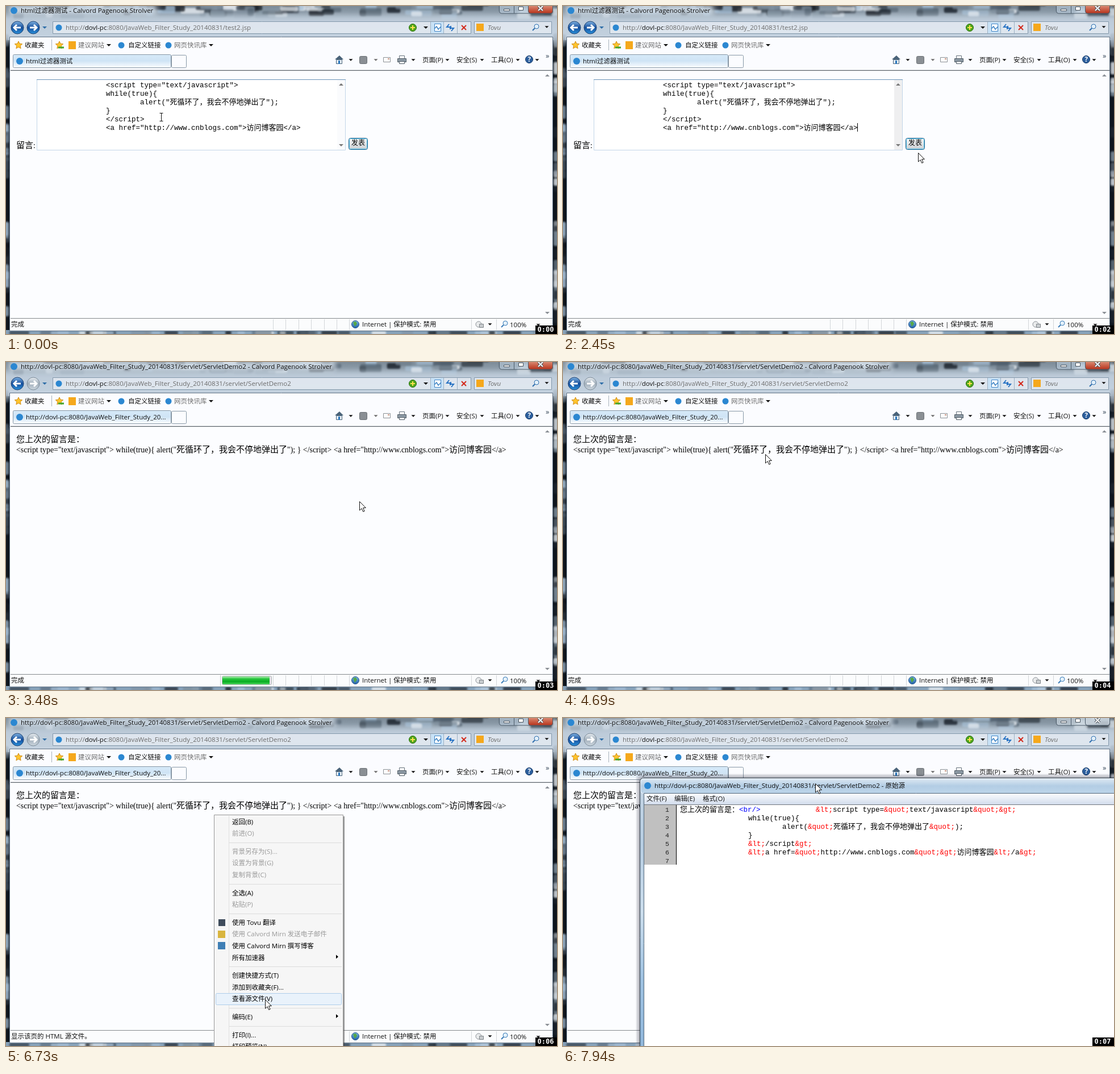
An HTML page with a canvas for the animation above (8000 ms loop, 970 px wide and 577 px high).

```html
<!DOCTYPE html>
<html lang="zh-CN">
<head>
<meta charset="utf-8">
<title>Filter demo</title>
<style>
html, body { margin: 0; width: 100%; height: 100%; overflow: hidden; }
canvas { display: block; width: 970px; height: 577px; }
</style>
</head>
<body>
<canvas id="stage" width="970" height="577"></canvas>
<script>
const LOOP = 8000, W = 970, H = 577;
const stage = document.getElementById('stage').getContext('2d');
let c = stage;

const CJK = '"Noto Sans CJK SC", sans-serif';
const UI = '11.5px "Open Sans", ' + CJK;
const BODY = ['13.9px "Liberation Serif", serif', '15px ' + CJK];
const MONO = ['12.5px "Liberation Mono", monospace', '13px ' + CJK];
const BROWSER = ' - Calvord Pagenook Strolver';
const HOST = 'dovl-pc', APP = ':8080/JavaWeb_Filter_Study_20140831/';
const BLUE = '#2b87d1', ORANGE = '#f5a81c', INK = '#111', GREY = '#6d6d6d';

// Pointer poses, held until the next one: time, x, y
const POSES = [
  [0, 273, 195], [120, 266, 197], [240, 258, 199], [390, 250, 202], [510, 257, 205],
  [640, 270, 208], [760, 288, 211], [880, 310, 213], [970, 331, 214], [1120, 452, 215],
  [1280, 501, 219], [1420, 512, 217], [1540, 518, 215], [1690, 519, 214], [1810, 524, 214],
  [1960, 540, 224], [2080, 560, 243], [2180, 579, 259], [2330, 604, 262], [2450, 625, 258],
  [2600, 622, 245], [3750, 530, 222], [3880, 408, 194], [4020, 384, 190], [4120, 376, 187],
  [4270, 365, 175], [4420, 364, 174], [4570, 359, 167], [4690, 356, 162], [5120, 365, 170],
  [5490, 372, 190], [5610, 408, 256], [5730, 429, 290], [5880, 440, 370], [6000, 452, 434],
  [6150, 456, 454], [6300, 456, 474], [6430, 456, 487], [6580, 456, 492], [6730, 456, 495],
  [7250, 454, 461], [7400, 451, 340], [7520, 448, 222], [7670, 445, 140], [7790, 444, 115]
];

// "~" disabled, ">" opens a submenu, "-" separator
const MENU = ['返回(B)', '~前进(O)', '-', '~背景另存为(S)...', '~设置为背景(G)', '~复制背景(C)', '-',
  '全选(A)', '~粘贴(P)', '-', '使用 Tovu 翻译', '~使用 Calvord Mirn 发送电子邮件',
  '使用 Calvord Mirn 撰写博客', '>所有加速器', '-', '创建快捷方式(T)', '添加到收藏夹(F)...',
  '查看源文件(V)', '-', '>编码(E)', '-', '打印(I)...', '打印预览(N)...'];

const INDENT = ' '.repeat(16);
const SOURCE = ['您上次的留言是：<br/>' + ' '.repeat(13) + '&lt;script type=&quot;text/javascript&quot;&gt;',
  INDENT + 'while(true){',
  INDENT + '        alert(&quot;死循环了，我会不停地弹出了&quot;);',
  INDENT + '}',
  INDENT + '&lt;/script&gt;',
  INDENT + '&lt;a href=&quot;http://www.cnblogs.com&quot;&gt;访问博客园&lt;/a&gt;', ''];
const MESSAGE = ['<script type="text/javascript">', 'while(true){',
  '        alert("死循环了，我会不停地弹出了");', '}', '<\/script>',
  '<a href="http://www.cnblogs.com">访问博客园</a>'];
const ECHO = MESSAGE.map(s => s.trim()).join(' ');

function rect(x, y, w, h, fill, stroke, r = 0) {
  c.beginPath();
  c.roundRect(x, y, w, h, r);
  if (fill) { c.fillStyle = fill; c.fill(); }
  if (stroke) { c.strokeStyle = stroke; c.lineWidth = 1; c.stroke(); }
}
function dot(x, y, r, fill, stroke) { rect(x - r, y - r, 2 * r, 2 * r, fill, stroke, r); }
function path(points, fill, stroke, width = 1) {
  c.beginPath();
  points.forEach(([x, y]) => c.lineTo(x, y));
  if (fill) { c.closePath(); c.fillStyle = fill; c.fill(); }
  if (stroke) { c.strokeStyle = stroke; c.lineWidth = width; c.stroke(); }
}
function line(x1, y1, x2, y2, color, width) { path([[x1, y1], [x2, y2]], null, color, width); }
function text(x, y, s, color = INK, font = UI) {
  c.font = font;
  c.fillStyle = color;
  c.fillText(s, x, y);
  return x + c.measureText(s).width;
}
function down(x, y, color = INK, s = 4) { path([[x - s, y - s / 2], [x + s, y - s / 2], [x, y + s / 2]], color); }
function up(x, y, color) { path([[x - 4, y + 2], [x + 4, y + 2], [x, y - 2]], color); }
function fade(y1, y2, ...colors) {
  const g = c.createLinearGradient(0, y1, 0, y2);
  colors.forEach((k, i) => g.addColorStop(i / (colors.length - 1), k));
  return g;
}
function star(x, y, r) {
  const pts = Array.from({ length: 10 }, (_, i) => {
    const a = i * Math.PI / 5 - Math.PI / 2, d = i % 2 ? r * .48 : r;
    return [x + d * Math.cos(a), y + d * Math.sin(a)];
  });
  path(pts, '#ffc52e', '#d08a12');
}
function lens(x, y, color) {
  dot(x + 1, y - 1, 4, '#e4f1fb', color);
  line(x - 2, y + 2, x - 6, y + 6, color, 2);
}
// Latin and Chinese runs in their own fonts; in colored code, entities are red and tags blue
function mixed(x, y, s, [latin, han], colored) {
  for (const part of s.split(/(&\w+;|<br\/>|[^\x00-\x7f]+)/)) {
    const color = colored && part[0] === '&' ? '#f00' : colored && part === '<br/>' ? '#00f' : '#000';
    x = text(x, y, part, color, /[^\x00-\x7f]/.test(part) ? han : latin);
  }
}

// Draws once into a canvas of its own
function layer(w, h, paint) {
  const canvas = document.createElement('canvas');
  canvas.width = w; canvas.height = h;
  c = canvas.getContext('2d');
  paint();
  c = stage;
  return canvas;
}

// Blurred desktop seen through the window frame
function paintBackdrop() {
  let seed = 11;
  const rnd = () => (seed = seed * 16807 % 2147483647) / 2147483647;
  const tones = ['#11161c', '#e5ebf0', '#4e5d6b', '#1c242d', '#a4bdd4', '#7d8d9b'];
  const blobs = (count, place) => {
    for (let i = 0; i < count; i++) {
      c.globalAlpha = .5 + rnd() * .4;
      const [x, y, w, h] = place(i);
      rect(x, y, w, h, tones[i % 6], null, 3);
    }
    c.globalAlpha = 1;
  };
  rect(0, 0, W, H, '#0e151d');
  rect(0, 0, W, 60, fade(0, 56, '#7c8b98', '#a3b2bf', '#bccbd9'));
  rect(0, 570, W, 7, '#86a1b9');
  c.filter = 'blur(1.5px)';
  blobs(90, () => [rnd() * W, rnd() * 18 - 8, 10 + rnd() * 32, 5 + rnd() * 10]);
  blobs(60, i => [i % 2 ? 964 : -3, 20 + rnd() * 540, 8, 6 + rnd() * 26]);
  blobs(40, () => [rnd() * W, 572, 10 + rnd() * 30, 6]);
  c.filter = 'blur(5px)';
  rect(-10, 17, W + 20, 45, 'rgba(197,211,224,.8)');
  c.filter = 'none';
}

function titleBar(title, active) {
  c.filter = 'blur(4px)';
  c.font = UI;
  rect(6, -2, c.measureText(title).width + 26, 18, 'rgba(206,218,229,.9)');
  c.filter = 'none';
  dot(14, 8, 6, BLUE);
  text(26, 12, title);
  rect(868.5, -4, 94, 17, active ? 'rgba(190,207,222,.7)' : 'rgba(205,216,226,.75)', '#4b5a68', 4);
  rect(919.5, -4, 43, 17, active ? fade(0, 13, '#d8876f', '#b8321a') : 'rgba(205,216,226,.4)', '#4b5a68', 4);
  line(894.5, 0, 894.5, 13, '#4b5a68');
  rect(876.5, 5.5, 10, 3, '#fff', '#48525c');
  rect(902.5, 1.5, 8, 6, '#fff', '#48525c');
  for (const [color, w] of [['#48525c', 4], ['#fff', 2]]) {
    line(937, 0, 945, 8, color, w);
    line(945, 0, 937, 8, color, w);
  }
}

function navRow(echo) {
  const arrow = (x, dir, on) => {
    dot(x, 38, 11, on ? fade(27, 49, '#7fb2e2', '#164f9c', '#2a90da') : fade(27, 49, '#e6ebf0', '#a2b0bc', '#ccd6de'), on ? '#1d4172' : '#7c8b99');
    line(x - 6, 38, x + 6, 38, '#fff', 3);
    path([[x + dir, 33], [x + 6 * dir, 38], [x + dir, 43]], null, '#fff', 3);
  };
  arrow(20, -1, true);
  arrow(48, 1, !echo);
  down(68, 38, '#2f6ea8');
  rect(82.5, 27.5, 736, 21, 'rgba(232,238,244,.75)', '#8398ab');
  dot(93, 38, 5.5, BLUE);
  let x = text(105, 42, 'http://', GREY);
  x = text(x, 42, HOST);
  text(x, 42, APP + (echo ? 'servlet/ServletDemo2' : 'test2.jsp'), GREY);
  dot(716, 38, 6.5, '#4fa51d', '#2d7010');
  line(712, 38, 720, 38, '#ffe14d', 2);
  line(716, 34, 716, 42, '#ffe14d', 2);
  down(739, 38);
  for (const px of [747.5, 770.5, 794.5]) line(px, 28, px, 48, '#9db0c2');
  rect(748, 28, 22, 20, '#c9e2f6');
  rect(754.5, 31.5, 11, 13, '#fff', '#3d83c4');
  path([[754, 40], [758, 36], [761, 41], [766, 36]], null, '#3d83c4', 1.5);
  path([[780, 32], [776, 37], [782, 37], [782, 41]], null, '#2a74c4', 2);
  path([[784, 44], [788, 39], [783, 39], [783, 35]], null, '#2a74c4', 2);
  line(802, 34, 810, 42, '#d22a1c', 2);
  line(810, 34, 802, 42, '#d22a1c', 2);
  rect(824.5, 27.5, 136, 21, 'rgba(232,238,244,.75)', '#8398ab');
  rect(828, 31, 13, 13, ORANGE);
  text(848, 42, 'Tovu', GREY, 'italic ' + UI);
  lens(933, 37, '#2f6fae');
  down(952, 37, INK, 3.5);
}

function toolbars(tab) {
  rect(6.5, 54.5, 956, 517, '#fbfcff', '#5f7183');
  star(22, 69, 7);
  text(33, 73, '收藏夹');
  line(80.5, 59, 80.5, 78, '#a8b2bb');
  star(94, 69, 7);
  line(92, 73, 102, 73, '#43a52b', 3);
  rect(110, 62, 13, 14, ORANGE);
  text(127, 73, '建议网站', GREY);
  down(181, 69);
  dot(203, 69, 5.5, BLUE);
  text(215, 73, '自定义链接');
  dot(286, 69, 5.5, BLUE);
  text(296, 73, '网页快讯库', GREY);
  down(361, 69);

  rect(12.5, 85.5, 278, 23, fade(85, 108, '#d6e9f8', '#cfe4f5', '#fafcff'), '#8797a5', 2);
  rect(291.5, 86.5, 26, 22, '#fbfcff', '#8797a5', 2);
  dot(24, 97, 6, BLUE);
  text(35, 101, tab);

  path([[579, 94], [587, 87], [594, 94]], '#4a6379');
  rect(581.5, 94.5, 10, 7, '#e6edf3', '#4a6379');
  rect(585, 96, 3, 6, '#2d78bd');
  rect(622.5, 88.5, 13, 13, '#8a8f94', '#6b7075', 2);
  rect(664.5, 90.5, 12, 8, '#fdfdfd', '#8b9095');
  rect(672, 92, 3, 2, '#c98');
  rect(692.5, 87.5, 9, 6, '#fff', '#65717c');
  rect(689.5, 92.5, 15, 6, '#8d9aa5', '#4d5963');
  rect(692.5, 97.5, 9, 4, '#fff', '#4d5963');
  [607, 717, 777, 838, 901, 935].forEach(x => down(x, 95, INK, 3.5));
  down(651, 95, GREY, 3.5);
  text(733, 99, '页面(P)');
  text(793, 99, '安全(S)');
  text(854, 99, '工具(O)');
  dot(921, 94, 6.5, '#2c5f9e', '#173a68');
  text(918.5, 98, '?', '#fff', 'bold ' + UI);
  text(950, 92, '»', '#345', '13px "Open Sans", sans-serif');
  line(8, 113.5, 962, 113.5, '#5d646b', 1.5);
  rect(8, 114, 954, 435, '#fcfdff');
  up(953, 122, '#8a8f95');
  down(953, 540, '#8a8f95');
}

function statusBar(label, progress) {
  rect(8, 549, 954, 22, '#fbfcfd');
  line(8, 549.5, 962, 549.5, '#85898d');
  text(9, 564, label);
  [470, 492, 515, 537, 560, 582, 604, 819, 863].forEach(x => line(x + .5, 551, x + .5, 570, '#d3d6d9'));
  if (progress > 0) {
    line(377.5, 551, 377.5, 570, '#c3c7ca');
    rect(380.5, 552.5, 87, 15, '#e2e4e5', '#aeb3b6', 2);
    rect(381, 553, 83 * progress, 14, fade(553, 567, '#b2eeb4', '#25c43b', '#08ad22', '#4bd55b'));
  }
  dot(615, 560, 6.5, fade(553, 567, '#7db8e6', '#1e5da6'), '#24588f');
  path([[611, 556], [616, 555], [618, 559], [614, 564]], '#56a946');
  text(627, 564, 'Internet | 保护模式: 禁用');
  dot(832, 560, 5, '#e9ebec', '#8b9197');
  rect(833.5, 559.5, 7, 6, '#c9cdd0', '#7d8388');
  down(852, 560, INK, 3.5);
  lens(878, 559, '#3a7cb8');
  text(887, 565, '100%');
  down(937, 561, INK, 3.5);
}

function formPage(t) {
  mixed(18, 250, '留言:', BODY);
  rect(54.5, 129.5, 543, 124, '#fff', '#c3d6e8');
  line(54, 129.5, 598, 129.5, '#6a93b8');
  rect(583, 130, 14, 123, t < 2080 ? '#fafbfd' : '#efeff0');
  up(590, 138, '#777');
  down(590, 245, '#777');
  MESSAGE.forEach((s, i) => mixed(176, 143 + i * 14.9, s, MONO));
  if (t >= 1690) line(518.5, 206, 518.5, 221, '#000');
  const hot = t >= 2600;
  rect(603.5, 232.5, 33, 20, fade(232, 252, '#f4f6f7', hot ? '#d4edfb' : '#e4e7e9', hot ? '#a5d5f0' : '#c9ced2'), '#2c628b', 3);
  rect(604.5, 233.5, 31, 18, null, '#4fc3ea', 2);
  text(608, 245, '发表', '#000', '12px ' + CJK);
}

function echoPage() {
  mixed(18, 141, '您上次的留言是：', BODY);
  mixed(18, 159, ECHO, BODY);
}

function contextMenu(pointerY) {
  rect(369, 173, 227, 420, 'rgba(70,70,70,.55)');
  rect(366.5, 170.5, 227, 420, '#f6f6f6', '#979797');
  line(392.5, 172, 392.5, H, '#e0e0e0');
  let y = 182.5;
  for (const item of MENU) {
    if (item === '-') {
      line(393, Math.round(y - 5) + .5, 591, Math.round(y - 5) + .5, '#dcdcdc');
      y += 11;
      continue;
    }
    if (Math.abs(pointerY - y) < 10.3) rect(369.5, Math.round(y - 10) + .5, 221, 20, '#e9f2fb', '#aecdea', 2);
    text(398, y + 4, item.replace(/^[~>]/, ''), item[0] === '~' ? '#9a9a9a' : '#000');
    if (item[0] === '>') path([[581, y - 5], [585, y - 1.5], [581, y + 2]], '#000');
    y += 20.6;
  }
  rect(374, 354, 12, 12, '#3f4c5c');
  rect(373, 374, 13, 13, '#d9b53e');
  rect(373, 394, 13, 13, '#3f7fb5');
}

function paintSourceWindow() {
  for (let i = 1; i < 8; i++) rect(135 - i, 105 - i, 1000, 600, 'rgba(20,35,50,.05)', null, 8);
  rect(135.5, 105.5, 1000, 600, fade(105, 577, '#c3d3e2', '#b4cbe0', '#c9dbea', '#9dc0df', '#8fb5d9'), '#2b3a48', 6);
  rect(136.5, 106.5, 1000, 26, fade(106, 133, '#dfeaf4', '#b3cde4', '#bdd5ea'), 'rgba(255,255,255,.7)', 5);
  dot(149, 119, 6, BLUE);
  text(161, 123, 'http://' + HOST + APP + 'servlet/ServletDemo2 - 原始源');
  rect(142.5, 132.5, 1000, 600, '#fff', '#53687b');
  rect(143, 133, 1000, 19, fade(133, 152, '#fbfcfe', '#e6ecf5', '#d3dded'));
  line(143, 152.5, 1140, 152.5, '#71777e');
  text(147, 146, '文件(F)');
  text(196, 146, '编辑(E)');
  text(246, 146, '格式(O)');
  rect(143, 153, 56, 105, '#c0c0c0');
  line(199.5, 153, 199.5, 258, '#000');
  SOURCE.forEach((s, i) => {
    const y = 164.5 + i * 15;
    text(180, y, String(i + 1), '#222', '11.5px "Liberation Mono", monospace');
    mixed(206, y, s, MONO, true);
  });
}

const backdrop = layer(W, H, paintBackdrop);
const sourceWindow = layer(1100, 660, paintSourceWindow);

// The window grows about its middle while it fades in
function showSource(scale, alpha) {
  c.save();
  c.globalAlpha = alpha;
  c.translate(563, 251);
  c.scale(scale, scale);
  c.drawImage(sourceWindow, -563, -251);
  c.restore();
}

function pointer(x, y, beam) {
  if (beam) {
    line(x + .5, y - 7, x + .5, y + 7, INK);
    for (const dy of [-7, 7]) line(x - 2.5, y + dy + .5, x + 3.5, y + dy + .5, INK);
    return;
  }
  const shape = [[0, 0], [0, 15.5], [3.6, 12.2], [6.2, 17.8], [8.6, 16.8], [6.1, 11.2], [10.8, 11], [0, 0]];
  path(shape.map(([dx, dy]) => [x + .5 + dx, y + .5 + dy]), '#fff', INK);
}

function draw(t) {
  const at = POSES.findLastIndex(p => p[0] <= t);
  const [, x, y] = POSES[at];
  const echo = t >= 2880;
  const menu = t >= 5220 && t < 7130;
  // The highlight trails the pointer by one pose
  const hoverY = menu && t >= 5490 ? POSES[at - 1][2] : -99;
  const onSource = hoverY > 484 && hoverY < 505;
  const url = 'http://' + HOST + APP;
  const progress = t >= 3000 && t < 4120 ? Math.min(1, .3 + (t - 3000) / 680) : 0;

  c.drawImage(backdrop, 0, 0);
  titleBar((echo ? url + 'servlet/ServletDemo2' : 'html过滤器测试') + BROWSER, t < 7130);
  navRow(echo);
  toolbars(echo ? url.slice(0, 43) + '...' : 'html过滤器测试');
  if (echo) echoPage(); else formPage(t);
  statusBar(t >= 7130 ? '' : onSource ? '显示该页的 HTML 源文件。' : '完成', progress);

  if (menu) {
    c.globalAlpha = t < 5340 ? .55 : 1;
    contextMenu(hoverY);
    c.globalAlpha = 1;
  }
  if (t >= 7130) {
    const step = t < 7250 ? 0 : t < 7400 ? 1 : t < 7520 ? 2 : 3;
    showSource([.94, .978, .995, 1][step], [.35, .8, .96, 1][step]);
    if (step < 2) text(398, 498.5, '查看源文件(V)', step ? 'rgba(0,0,0,.25)' : 'rgba(0,0,0,.6)');
  }
  pointer(x, y, t < 2180);
  rect(932, 562, 38, 15, '#000');
  text(935.5, 573, '0:0' + Math.floor(t / 1000), '#fff', 'bold 12px "DejaVu Sans Mono", monospace');
}

const start = performance.now();
function tick() {
  draw((performance.now() - start) % LOOP);
  requestAnimationFrame(tick);
}
tick();
</script>
</body>
</html>
```
